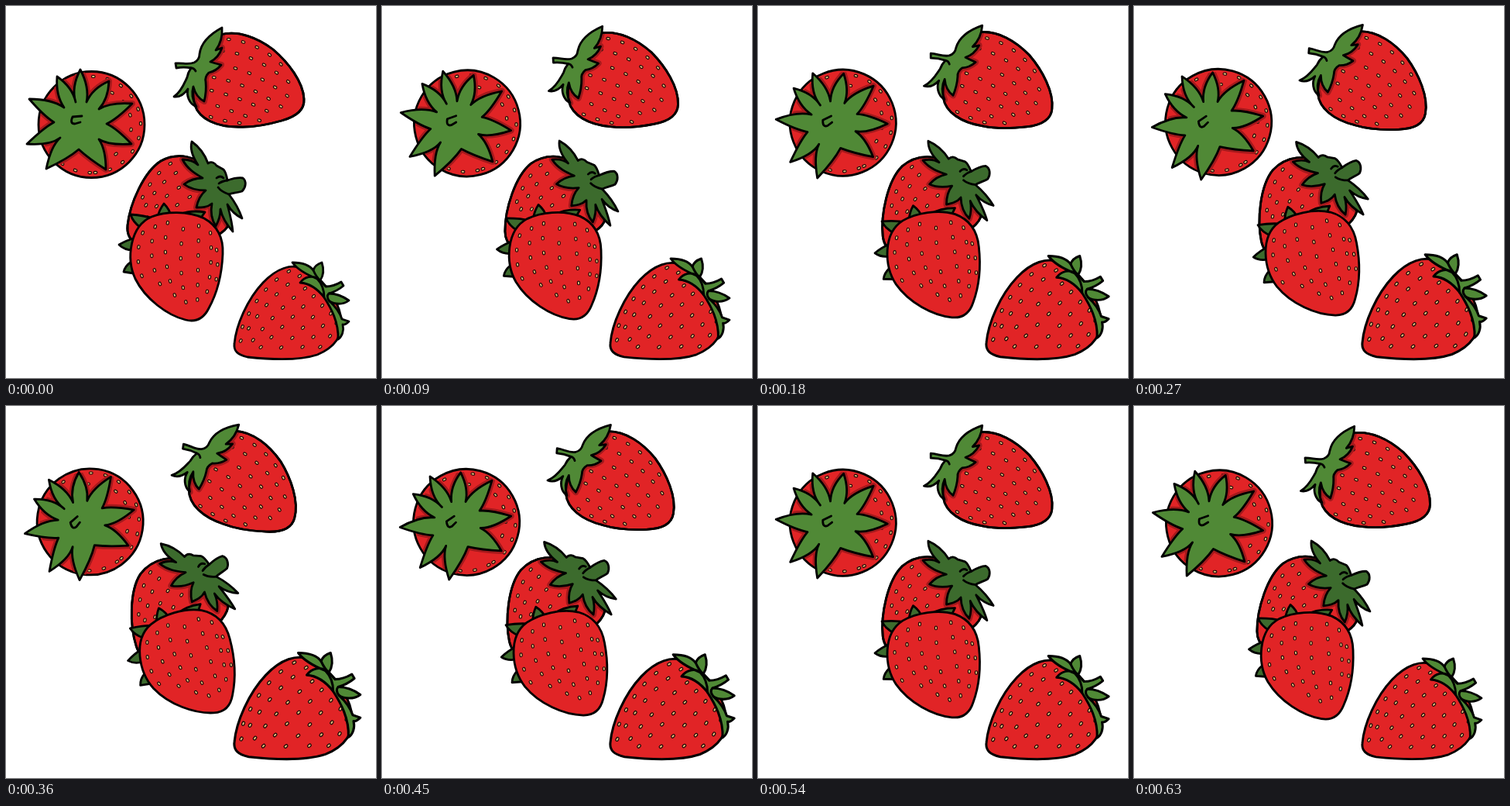
Animation of 478 by 480 pixels, one loop 720 ms. Source, as an HTML page without scripts:

```html
<!DOCTYPE html>
<html lang="en">
<head>
<meta charset="utf-8">
<title>Strawberries</title>
<style>
  html, body { margin: 0; width: 100%; height: 100%; overflow: hidden; background: #fff; }
  svg { display: block; width: 100%; height: 100%; }
  path, circle { stroke-linejoin: round; stroke-linecap: round; }

  .body { fill: #e12426; stroke: #000; stroke-width: 2.8; }
  .leaf { fill: #508936; stroke: #000; stroke-width: 2.8; }
  .dark { fill: #3c6b2d; }
  .vein { fill: none; stroke: #000; stroke-width: 2.8; }
  .shade { fill: #a5191c; stroke: #a5191c; stroke-width: 8; }
  .husk, .seed { fill: none; stroke-dasharray: 1.6 17.4; }
  .husk { stroke: #1c0806; stroke-width: 4.2; }
  .seed { stroke: #e0b878; stroke-width: 1.9; }

  /* --a is the full swing; poses go out and back in held steps */
  .sway, .whirl, .swell { animation: sway 720ms step-end infinite; }
  .whirl { animation-name: whirl; }
  .swell { animation-name: swell; }
  @keyframes sway {
    0%, 100% { rotate: 0deg; }
    12.5%, 87.5% { rotate: calc(var(--a) * .27); }
    25%, 75% { rotate: calc(var(--a) * .5); }
    37.5%, 62.5% { rotate: calc(var(--a) * .76); }
    50% { rotate: var(--a); }
  }
  @keyframes whirl {
    0%, 100% { rotate: 0deg; }
    12.5%, 87.5% { rotate: -14.5deg; }
    25%, 75% { rotate: -21.5deg; }
    37.5%, 62.5% { rotate: -29.5deg; }
    50% { rotate: -36deg; }
  }
  @keyframes swell {
    0%, 100% { scale: 1; }
    12.5%, 87.5% { scale: 1.04; }
    25%, 75% { scale: 1.068; }
    37.5%, 62.5% { scale: 1.082; }
    50% { scale: 1.1; }
  }
  #side  { --a: 18.2deg; transform-origin: 302px 94px; }
  .cap   { transform-origin: 96px 151px; }
  #round { transform-origin: 104px 154px; }
  #back  { --a: -24deg; transform-origin: 226px 270px; }
  #front { --a: -17.2deg; transform-origin: 220px 280px; }
  #low   { transform-origin: 295px 456px; }
</style>
</head>
<body>
<svg viewBox="0 0 478 480" preserveAspectRatio="none">
  <defs>
    <path id="sideBody" d="M277 37C300 31 325 41 345 56C365 73 384 98 385 120C386 134 374 143 356 148C335 154 318 157 300 156C272 156 250 146 244 128C236 100 252 45 277 37Z"/>
    <path id="sideLeaf" d="M239 80C233 79 226 79 220 80L219 74C228 73 235 76 243 73C249 70 250 66 250 62C252 46 264 36 279 28C280 40 277 49 271 57L279 54C276 63 270 69 264 72C270 74 274 75 278 76C273 82 267 85 262 86C258 90 257 94 258 98C259 108 258 115 256 123C248 119 244 112 242 104C239 114 241 122 246 130C236 126 233 115 235 107C231 113 225 118 217 117C227 110 231 98 234 92C235 86 237 83 239 80Z"/>
    <path id="sideSeeds" d="M287 43Q325 46 356 76M279 58Q325 62 372 104M277 77Q320 80 376 126M268 92Q315 100 364 136M265 109Q305 118 352 143M255 122Q290 136 335 150M264 143Q285 150 312 152"/>

    <circle id="roundBody" cx="110.5" cy="153" r="68.5"/>
    <path id="capLeaf" d="M90 124Q84 105 96 82Q108 105 104 124Q112 106 133 97Q132 120 120 133Q135 124 163 126Q143 146 130 152Q143 158 162 178Q133 180 120 172Q129 185 129 211Q107 197 94 185Q80 197 52 210Q58 181 70 170Q57 180 27 178Q49 157 62 150Q49 142 30 120Q59 120 75 131Q64 115 66 91Q86 105 90 124Z"/>
    <path id="roundSeeds" d="M112 91A62 62 0 0 1 112 215M72 203A62 62 0 0 0 112 215M118 107A46 46 0 0 1 114 199"/>

    <path id="backBody" d="M157 283C160 255 178 214 200 200C222 188 248 194 264 212C280 232 290 262 286 285C270 310 180 320 165 304C159 300 156 294 157 283Z"/>
    <path id="backLeaf" d="M240 175C250 182 257 192 261 203C266 200 270 203 272 206L281 211C284 214 285 219 286 225C292 223 300 221 306 222C311 226 310 234 305 239C299 241 293 241 288 243C295 252 301 262 305 274C297 270 290 263 286 256C289 268 292 278 293 291C284 281 279 272 277 262C277 270 275 277 271 284C265 275 264 266 266 255C260 260 253 260 246 260C248 250 252 243 258 238C248 238 238 236 230 230C238 224 246 222 254 222C244 216 234 210 228 198C236 198 243 200 248 205C242 196 237 186 240 175Z"/>
    <path id="backSeeds" d="M213 203Q186 220 170 262M220 215Q192 232 168 280M224 234Q200 246 172 288M238 246Q215 258 200 278"/>

    <path id="frontBody" d="M188 272C206 265 235 264 256 274C274 284 281 300 280 320C279 345 273 370 262 390C255 404 244 408 232 405C208 399 180 378 167 352C155 326 160 284 188 272Z"/>
    <path id="frontSeeds" d="M177 292Q163 325 179 356M193 284Q178 330 208 374M209 279Q198 330 224 388M229 287Q220 340 236 396M249 283Q248 340 247 394M264 292Q268 340 257 380M272 314Q276 340 268 370"/>

    <path id="lowBody" d="M295 436C297 412 312 378 332 357C350 338 368 333 383 338C405 348 427 372 433 402C437 425 424 441 402 450C378 458 340 456 312 453C299 450 294 445 295 436Z"/>
    <path id="lowLeaf" d="M370 331C382 331 392 334 397 341C398 337 402 333 408 331C411 340 410 348 406 354L413 362C420 362 428 359 433 356L436 361C430 366 424 369 417 371C427 371 436 375 443 380C435 386 424 385 418 381C428 390 432 398 434 404L443 407Q438 412 435 411C437 419 434 427 429 430C430 408 420 390 411 376C404 367 394 358 380 357C386 349 396 347 402 352C392 348 378 342 370 331Z"/>
    <path id="lowSeeds" d="M366 342Q325 365 303 420M380 348Q338 374 302 434M387 364Q350 392 312 440M398 374Q368 404 322 447M409 386Q385 418 345 449M420 396Q405 425 370 450M427 408Q420 432 396 447"/>

    <clipPath id="sideClip"><use href="#sideBody"/></clipPath>
    <clipPath id="roundClip"><circle cx="110" cy="151.5" r="66.5"/></clipPath>
    <clipPath id="backClip"><use href="#backBody"/></clipPath>
  </defs>

  <g id="side" class="sway">
    <use href="#sideBody" class="body"/>
    <use href="#sideSeeds" class="husk"/>
    <use href="#sideSeeds" class="seed"/>
    <g clip-path="url(#sideClip)"><use href="#sideLeaf" class="shade"/></g>
    <use href="#sideBody" class="vein"/>
    <use href="#sideLeaf" class="leaf"/>
    <path class="vein" d="M239 80Q243 80 245 84"/>
  </g>

  <g id="round" class="whirl">
    <use href="#roundBody" class="body"/>
    <use href="#roundSeeds" class="husk"/>
    <use href="#roundSeeds" class="seed"/>
  </g>
  <g clip-path="url(#roundClip)">
    <use href="#capLeaf" class="shade cap whirl"/>
  </g>
  <g class="cap whirl">
    <use href="#capLeaf" class="leaf"/>
    <path class="vein" d="M98 142L86 143Q82 152 89 152L96 150"/>
  </g>

  <g id="back" class="sway">
    <use href="#backBody" class="body"/>
    <use href="#backSeeds" class="husk"/>
    <use href="#backSeeds" class="seed"/>
    <g clip-path="url(#backClip)"><use href="#backLeaf" class="shade"/></g>
    <use href="#backBody" class="vein"/>
    <use href="#backLeaf" class="leaf dark"/>
    <path class="vein" d="M288 243C282 241 277 238 274 234M286 225Q279 226 275 229M272 222Q277 218 281 222"/>
  </g>

  <g id="front" class="sway">
    <path class="leaf dark" d="M196 272Q198 263 204 255Q212 263 213 272ZM161 269Q178 270 193 275L174 286Q164 279 161 269ZM225 269Q238 263 257 266L250 276ZM146 308Q156 302 168 299L164 315Q153 315 146 308ZM152 343Q154 335 162 330L165 345Z"/>
    <use href="#frontBody" class="body"/>
    <use href="#frontSeeds" class="husk"/>
    <use href="#frontSeeds" class="seed"/>
  </g>

  <g id="low" class="swell">
    <use href="#lowBody" class="body"/>
    <use href="#lowSeeds" class="husk"/>
    <use href="#lowSeeds" class="seed"/>
    <use href="#lowLeaf" class="leaf"/>
    <path class="vein" d="M402 352Q411 361 411 376M406 354Q401 350 397 341M417 371Q413 375 418 381"/>
  </g>
</svg>
</body>
</html>
```
